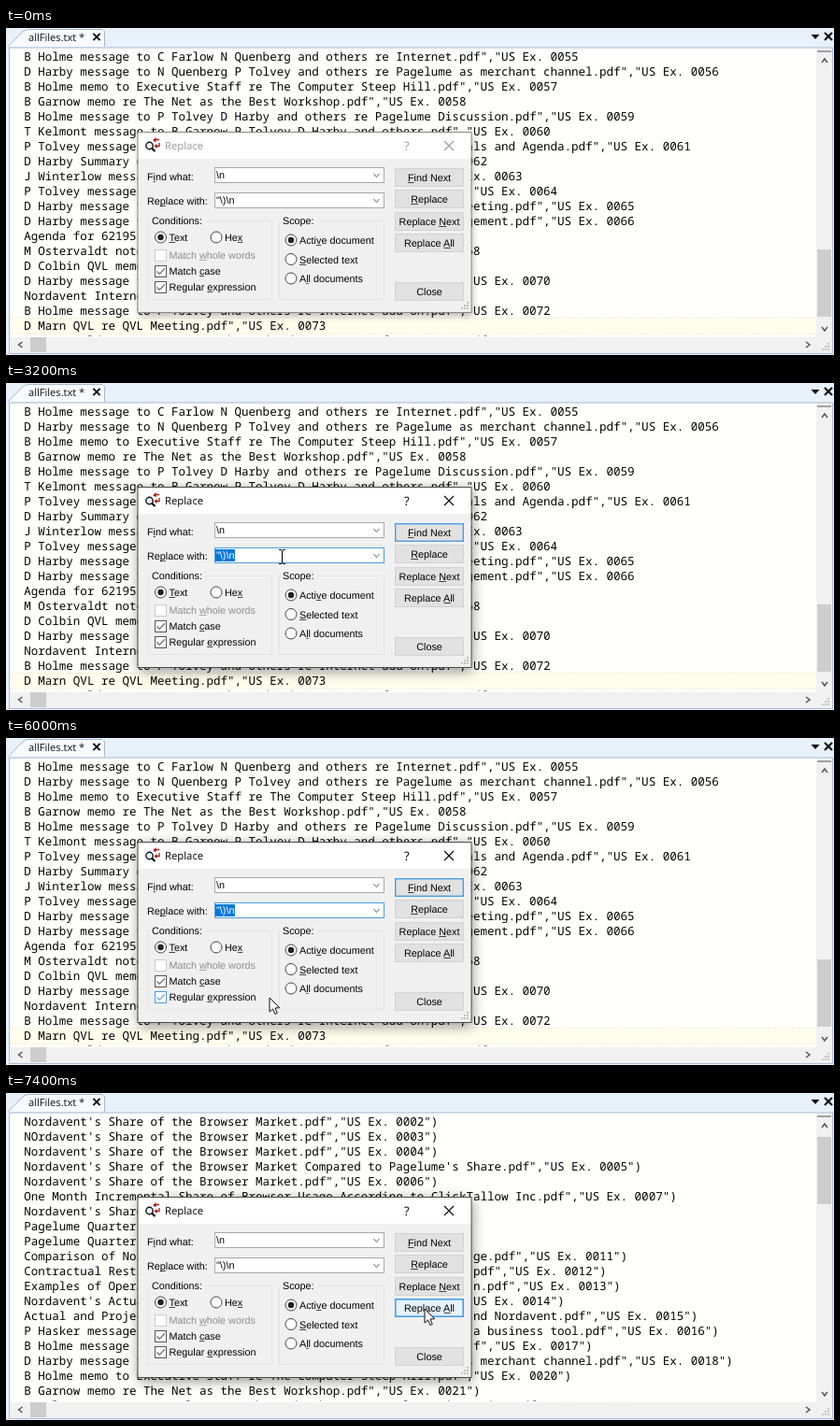
Recreate the animation shown at these times as an HTML page with a canvas. Size 886x350 px, loop 8000 ms.

```html
<!DOCTYPE html>
<html lang="en">
<head>
<meta charset="utf-8">
<title>Replace dialog</title>
<style>
html, body { margin: 0; width: 100%; height: 100%; overflow: hidden; background: #fff; }
canvas { display: block; width: 886px; height: 350px; }
</style>
</head>
<body>
<canvas id="stage"></canvas>
<script>
const W = 886, H = 350, LOOP = 8000, STEP = 200;
const REPLACED_AT = 7000;
const BLUE = '#0078d7', SOFT_BLUE = '#4a9de0';
const MONO = '12.53px "Noto Sans Mono", monospace';
const TITLE = '11.3px "Open Sans", sans-serif';
const LABEL = '10.8px "Liberation Sans", Arial, sans-serif';

const canvas = document.getElementById('stage');
const ratio = window.devicePixelRatio || 1;
canvas.width = W * ratio;
canvas.height = H * ratio;
const ctx = canvas.getContext('2d');

// Row whose middle stays behind the dialog: left part, right part, total columns.
const split = (left, right, cols) => left.padEnd(cols - right.length) + right;
const exhibit = (name, no, end = '') => `${name}.pdf","US Ex. ${no}${end}`;
const done = (name, no) => exhibit(name, no, '")');

const share = "Nordavent's Share of the Browser Market";
const channel = 'D Harby message to N Quenberg P Tolvey and others re Pagelume as merchant channel';
const hill = 'B Holme memo to Executive Staff re The Computer Steep Hill';
const workshop = 'B Garnow memo re The Net as the Best Workshop';
const discussion = 'B Holme message to P Tolvey D Harby and others re Pagelume Discussion';

const before = [
  exhibit('B Holme message to C Farlow N Quenberg and others re Internet', '0055'),
  exhibit(channel, '0056'),
  exhibit(hill, '0057'),
  exhibit(workshop, '0058'),
  exhibit(discussion, '0059'),
  exhibit('T Kelmont message to B Garnow P Tolvey D Harby and others', '0060'),
  split('P Tolvey message', exhibit('als and Agenda', '0061'), 95),
  split('D Harby Summary o', 'US Ex. 0062', 66),
  split('J Winterlow messa', 'US Ex. 0063', 71),
  split('P Tolvey message', '"US Ex. 0064', 76),
  split('D Harby message t', exhibit('eeting', '0065'), 87),
  split('D Harby message t', exhibit('gement', '0066'), 87),
  'Agenda for 62195',
  split('M Ostervaldt note', '0068', 65),
  'D Colbin QVL memo',
  split('D Harby message t', 'US Ex. 0070', 75),
  'Nordavent Internet',
  exhibit('B Holme message to P Tolvey and others re Internet add on', '0072'),
  exhibit('D Marn QVL re QVL Meeting', '0073'),
  exhibit('M Ostervaldt message to D Harby and others re user forum notes', '0074')
];

const after = [
  done(share, '0002'),
  done(share.replace('No', 'NO'), '0003'),
  done(share, '0004'),
  done(share + " Compared to Pagelume's Share", '0005'),
  done(share, '0006'),
  done('One Month Incremental Share of Browser Usage According to ClickTallow Inc', '0007'),
  "Nordavent's Share",
  'Pagelume Quarterl',
  'Pagelume Quarterl',
  split('Comparison of Nor', done('ge', '0011'), 86),
  split('Contractual Restr', done('', '0012').slice(1), 83),
  split('Examples of Opera', done('n', '0013'), 85),
  split("Nordavent's Actua", 'US Ex. 0014")', 77),
  split('Actual and Projec', done('nd Nordavent', '0015'), 96),
  split('P Hasker message', done('a business tool', '0016'), 99),
  split('B Holme message t', 'f","US Ex. 0017")', 81),
  done(channel, '0018'),
  done(hill, '0020'),
  done(workshop, '0021'),
  done(discussion, '0022')
];

// Pointer path: time, x, y
const path = [
  [800, 322, 196], [1400, 299, 164], [1800, 292, 161], [2400, 287, 184],
  [2800, 299, 198], [3200, 295, 186], [3400, 295, 186], [4400, 261, 276],
  [4800, 261, 276], [5800, 282, 278], [6000, 282, 278], [6600, 448, 231]
];

function pointerAt(t) {
  if (t < path[0][0]) return null;
  const i = path.findIndex(p => p[0] > t);
  if (i < 0) return path[path.length - 1].slice(1);
  const [t0, x0, y0] = path[i - 1], [t1, x1, y1] = path[i];
  const u = (t - t0) / (t1 - t0), e = u * u * (3 - 2 * u);
  return [x0 + (x1 - x0) * e, y0 + (y1 - y0) * e];
}

function fill(x, y, w, h, color) {
  ctx.fillStyle = color;
  ctx.fillRect(x, y, w, h);
}

function frame(x, y, w, h, color, line = 1) {
  ctx.strokeStyle = color;
  ctx.lineWidth = line;
  ctx.strokeRect(x + line / 2, y + line / 2, w - line, h - line);
}

function stroke(points, color, line = 1) {
  ctx.strokeStyle = color;
  ctx.lineWidth = line;
  ctx.beginPath();
  points.forEach(([x, y]) => ctx.lineTo(x, y));
  ctx.stroke();
}

function polygon(points, color) {
  ctx.fillStyle = color;
  ctx.beginPath();
  points.forEach(([x, y]) => ctx.lineTo(x, y));
  ctx.closePath();
  ctx.fill();
}

function text(s, x, y, font, color = '#000') {
  ctx.font = font;
  ctx.fillStyle = color;
  ctx.fillText(s, x, y);
}

// "&" marks the underlined access key.
function label(s, x, y, color = '#000', centered = false) {
  const at = s.indexOf('&'), plain = s.replace('&', '');
  ctx.font = LABEL;
  if (centered) x -= ctx.measureText(plain).width / 2;
  text(plain, x, y, LABEL, color);
  if (at < 0) return;
  const from = ctx.measureText(plain.slice(0, at)).width;
  ctx.globalAlpha = 0.7;
  fill(x + from, Math.round(y) + 1, ctx.measureText(plain[at]).width, 1, color);
  ctx.globalAlpha = 1;
}

function cross(x, y, r, color, line) {
  stroke([[x - r, y - r], [x + r, y + r]], color, line);
  stroke([[x + r, y - r], [x - r, y + r]], color, line);
}

function chevron(x, y, dx, dy, color = '#505050', line = 1.4) {
  const points = dx
    ? [[x - dx / 2, y - 3], [x + dx / 2, y], [x - dx / 2, y + 3]]
    : [[x - 3, y - dy / 2], [x, y + dy / 2], [x + 3, y - dy / 2]];
  stroke(points, color, line);
}

function grip(x, y, color) {
  for (let r = 0; r < 3; r++)
    for (let c = 2 - r; c < 3; c++) fill(x + c * 3, y + r * 3, 2, 2, color);
}

function drawTabs() {
  fill(0, 0, W, H, '#eef3fa');
  fill(0, 0, W, 20, '#e8f0f9');
  polygon([[2, 20], [20, 2], [24, 1], [105, 1], [105, 20]], '#f7faff');
  stroke([[2, 20], [19, 3], [24, 1.5], [103, 1.5], [105.5, 4], [105.5, 20]], '#a3b8d3');
  text('allFiles.txt *', 24, 14, '11.1px "Open Sans", sans-serif', '#111');
  cross(97, 9.5, 3.6, '#111', 2);
  polygon([[861.5, 7], [870.5, 7], [866, 12]], '#111');
  cross(880, 9, 4, '#111', 2.2);
  frame(3, 20.5, 882, 328.5, '#a9bcd6');
}

function drawEditor(replaced) {
  fill(4, 22, 863, 309, '#fffffc');
  if (!replaced) {
    fill(4, 310, 863, 17, '#fffdec');
    ctx.setLineDash([1, 2]);
    stroke([[4, 310.5], [867, 310.5]], '#efe6bd');
    stroke([[4, 327.5], [867, 327.5]], '#efe6bd');
    ctx.setLineDash([]);
  }
  ctx.save();
  ctx.beginPath();
  ctx.rect(4, 22, 863, 308);
  ctx.clip();
  (replaced ? after : before).forEach((row, i) => {
    text(row, 19.3, 34.6 + i * 16.03, MONO);
  });
  ctx.restore();

  fill(867, 22, 17, 309, '#f1f1f1');
  fill(868, 24, 15, 2, '#a0a0a0');
  chevron(876, 35, 0, -4);
  chevron(876, 322, 0, 4);
  fill(868, replaced ? 47 : 237, 15, 72, '#cdcdcd');
  fill(4, 331, 880, 17, '#f1f1f1');
  chevron(15.5, 339, -4, 0);
  chevron(858, 339, 4, 0);
  fill(26, 331, 17, 16, '#cdcdcd');
  grip(873, 337, '#c4c4c4');
}

function combo(y, value, focused, selected) {
  fill(223, y, 182, 17, '#fff');
  frame(223, y, 182, 17, focused ? SOFT_BLUE : '#a8a8a8');
  chevron(396.5, y + 8.7, 0, 3.6, '#666', 1);
  if (selected) {
    ctx.font = LABEL;
    fill(224, y + 2, ctx.measureText(value).width + 1.5, 13, BLUE);
  }
  text(value, 225, y + 12, LABEL, selected ? '#fff' : '#000');
}

function button(y, s, state) {
  const looks = {
    normal: ['#e1e1e1', '#d2d2d2', 1],
    primary: ['#e1e1e1', SOFT_BLUE, 1.4],
    hover: ['#e5f1fb', SOFT_BLUE, 1],
    focus: ['#e5f1fb', SOFT_BLUE, 1.6],
    pressed: ['#c4dff5', '#2c6ea8', 1.6]
  };
  const [face, edge, line] = looks[state || 'normal'];
  fill(416, y, 74, 20, face);
  frame(416, y, 74, 20, edge, line);
  label(s, 453, y + 14, '#000', true);
}

function radio(x, y, s, on) {
  ctx.beginPath();
  ctx.arc(x, y, 6, 0, 7);
  ctx.fillStyle = '#fff';
  ctx.fill();
  ctx.strokeStyle = '#444';
  ctx.lineWidth = 1;
  ctx.stroke();
  if (on) {
    ctx.beginPath();
    ctx.arc(x, y, 3.2, 0, 7);
    ctx.fillStyle = '#222';
    ctx.fill();
  }
  label(s, x + 9, y + 4);
}

function check(y, s, on, edge = '#555', color = '#000') {
  fill(159, y - 6, 13, 13, '#fff');
  frame(159, y - 6, 13, 13, edge);
  if (on) stroke([[161.5, y + 0.5], [164.3, y + 3.3], [169.8, y - 2.6]], edge, 1.1);
  label(s, 174.5, y + 4, color);
}

function group(x, w, s) {
  frame(x, 206, w, 85, '#e3e3e3');
  ctx.font = LABEL;
  fill(x + 2, 203, ctx.measureText(s).width + 6, 6, '#f0f0f0');
  label(s, x + 4, 210);
}

function drawIcon() {
  ctx.beginPath();
  ctx.arc(153.5, 126, 3.7, 0, 7);
  ctx.fillStyle = '#eef6ff';
  ctx.fill();
  ctx.strokeStyle = '#111';
  ctx.lineWidth = 1.4;
  ctx.stroke();
  stroke([[156, 128.5], [159.5, 132]], '#111', 2.2);
  stroke([[158, 121], [160, 119.5], [164, 119.5]], '#a01818', 1.3);
  polygon([[160.5, 117], [160.5, 122.5], [157.5, 120]], '#a01818');
  stroke([[160, 126.5], [164, 126.5], [164, 123]], '#a01818', 1.3);
  polygon([[161.5, 124], [161.5, 129], [158.5, 126.5]], '#a01818');
}

function drawDialog(t) {
  const active = t >= 200;
  const findFocus = active && t < 2600;
  const pressed = t >= 6800 && t < REPLACED_AT;
  const selecting = t >= 2600 && t < 6800;
  const ink = active ? '#000' : '#999';

  ctx.save();
  ctx.shadowColor = active ? 'rgba(0,0,0,.45)' : 'rgba(0,0,0,.3)';
  ctx.shadowBlur = (active ? 13 : 7) * ratio;
  ctx.shadowOffsetX = ratio;
  ctx.shadowOffsetY = 3 * ratio;
  fill(141, 111, 357, 194, '#f0f0f0');
  ctx.restore();
  fill(141, 111, 357, 29, '#fff');
  frame(140.5, 111, 358, 194, active ? '#4c4c4c' : '#8a8a8a');

  drawIcon();
  text('Replace', 170, 130, TITLE, ink);
  text('?', 426, 131, '13px "Open Sans", sans-serif', ink);
  cross(474, 126, 5, ink, 1.1);

  label('F&ind what:', 151, 163);
  label('Re&place with:', 151, 189);
  combo(149, '\\n', findFocus, findFocus);
  combo(176, '"\\)\\n', selecting || pressed, selecting);

  group(152, 133, 'Conditions:');
  radio(165.5, 224, '&Text', true);
  radio(225, 224, 'He&x', false);
  check(243, 'Match &whole words', false, '#cccccc', '#8c8c8c');
  check(260, 'Match &case', true);
  const over = t >= 4400 && t < 6200;
  check(277, 'Regular &expression', true, over ? SOFT_BLUE : '#555');

  group(292, 113, 'Scope:');
  radio(305, 227, 'Acti&ve document', true);
  radio(305, 247.5, '&Selected text', false);
  radio(305, 268, 'A&ll documents', false);

  button(150, '&Find Next', active && t < 6800 ? 'primary' : 'normal');
  button(173, '&Replace');
  button(197, 'Replace &Next');
  button(220, 'Replace &All',
    t >= REPLACED_AT ? 'focus' : pressed ? 'pressed' : t >= 6600 ? 'hover' : 'normal');
  button(272, 'Close');
  grip(487, 293, '#c0c0c0');
}

function drawPointer(t) {
  const p = pointerAt(t);
  if (!p) return;
  const [x, y] = p.map(Math.round);
  if (y < 200) {
    fill(x, y - 7, 1, 14, '#000');
    for (const edge of [y - 8, y + 7]) {
      fill(x - 3, edge, 3, 1, '#000');
      fill(x + 1, edge, 3, 1, '#000');
    }
    return;
  }
  const arrow = [[0, 0], [0, 16.5], [3.8, 13], [6.4, 19], [9, 17.9], [6.5, 12], [11.6, 11.6]]
    .map(([dx, dy]) => [x + dx * 0.92, y + dy * 0.92]);
  polygon(arrow, '#fff');
  stroke([...arrow, arrow[0]], '#111', 1);
}

function draw(now) {
  const t = Math.floor((now % LOOP) / STEP) * STEP;
  ctx.setTransform(ratio, 0, 0, ratio, 0, 0);
  ctx.textRendering = 'geometricPrecision';
  drawTabs();
  drawEditor(t >= REPLACED_AT);
  drawDialog(t);
  drawPointer(t);
}

const start = performance.now();
function tick() {
  draw(performance.now() - start);
  requestAnimationFrame(tick);
}
tick();
</script>
</body>
</html>
```
